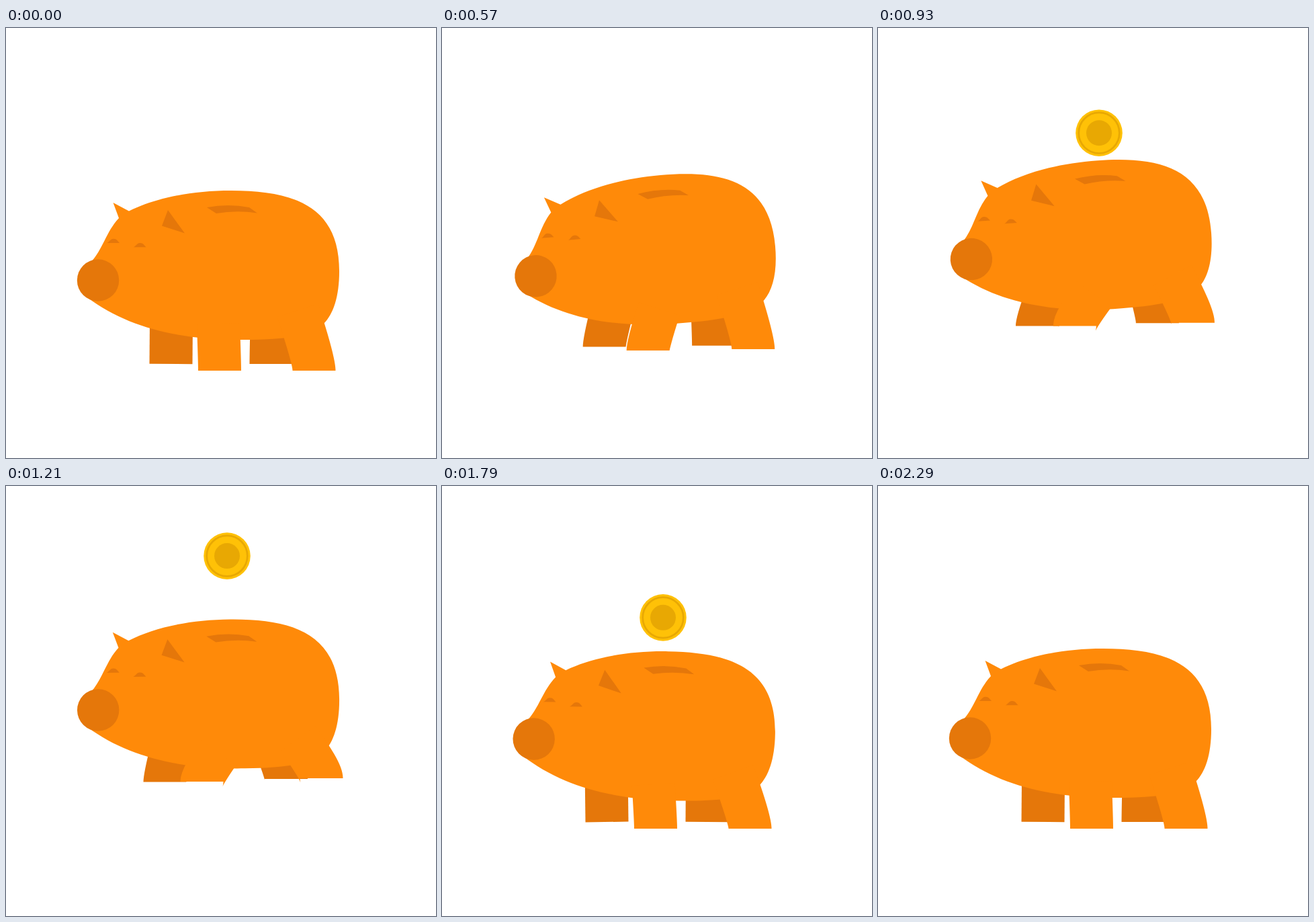
An HTML page for the animation above (3570 ms loop, 640 px wide and 640 px high).

```html
<!DOCTYPE html>
<html lang="en">
<head>
<meta charset="utf-8">
<title>Piggy bank</title>
<style>
  html, body { margin: 0; width: 100%; height: 100%; overflow: hidden; background: #fff; }
  svg { display: block; width: 100%; height: 100%; }
  .main { fill: #ff8a09; }
  .dark { fill: #e5770a; }
  .leg { fill: none; stroke: #ff8a09; stroke-width: 64; }
  .leg.far { stroke: #e5770a; }
</style>
</head>
<body>
<svg viewBox="0 0 640 640">
  <g id="coin">
    <circle r="34.8" fill="#ffc107"/>
    <circle r="30.3" fill="none" stroke="#e8a803" stroke-width="2.7"/>
    <circle r="19" fill="#e8a803"/>
  </g>
  <path class="leg far"/>
  <path class="leg far"/>
  <g id="body">
    <path class="main" d="M126 349C144 330 149 303 168 283L159.5 260L183 272.5
      C221 253.5 274 242 335 242C430 242 496 266 496 362C496 400 487 426 473 440
      C455 458 418 464 355 464C262 465 182 447 121 401Z"/>
    <circle class="dark" cx="137" cy="375.5" r="31.2"/>
    <path class="dark" d="M241 271L266 305.5L232 294.5Z"/>
    <path class="dark" id="eye" d="M150 320C154 319 155 313.8 160 313.8S166 317 169 320Z"/>
    <use href="#eye" x="39.5" y="6.3"/>
    <path class="dark" d="M299 267Q331 261 362 267L374 275.5Q343 271 313 276Z"/>
  </g>
  <path class="leg"/>
  <path class="leg"/>
</svg>
<script>
const LOOP = 3570, STEP = 50 / 7, REST = 32;
const PIVOT = { x: 301, y: 354 };
const TAKEOFF = 6, TOP_START = 16, TOP_END = 17, LANDING = 25;

const easeIn = p => u => u ** p;
const easeOut = p => u => 1 - (1 - u) ** p;
const easeBoth = u => (1 - Math.cos(Math.PI * u)) / 2;
const progress = (s, from, to) => Math.min(1, Math.max(0, (s - from) / (to - from)));

// Builds a motion from moves of the form [end step, end value, easing].
const motion = (start, ...moves) => s => {
  let from = 0, value = start;
  for (const [to, target, ease] of moves) {
    if (s < to) return value + (target - value) * ease(progress(s, from, to));
    from = to;
    value = target;
  }
  return value;
};

const tilt = motion(0, [4, 0.9, easeBoth], [10, -5.2, easeOut(3)], [17, -0.45, easeIn(1.6)],
  [21, 0.9, easeOut(2)], [25, 0.9, easeBoth], [28, -1.5, easeBoth], [REST, 0, easeBoth]);
const lift = motion(0, [4, 8, easeBoth], [15, -46, easeOut(1.65)], [17, -43.3, easeBoth],
  [25, 3.6, easeIn(2.8)], [27, 9, easeOut(2)], [REST, 0, easeBoth]);
const coinY = motion(295, [9, 275, easeIn(9)], [19, 99, easeOut(2.2)], [27, 295, easeIn(2.45)]);

// jump: foot offset at the top of the hop; kick: sideways swing while falling
const legs = [
  { hip: [246, 435], foot: [245.5, 500], jump: [-9, -59.5], kick: 0, fall: 3.4 },
  { hip: [396, 420], foot: [394.5, 500], jump: [22.5, -64], kick: 0, fall: 2.2 },
  { hip: [316, 440], foot: [318, 510], jump: [-26.5, -70], kick: -22, fall: 2.1 },
  { hip: [434, 420], foot: [458.5, 510], jump: [11, -75], kick: -14, fall: 1.4 }
];

function footAt(leg, s) {
  const up = easeOut(2.5)(progress(s, TAKEOFF, TOP_START));
  const down = progress(s, TOP_END, LANDING);
  const height = up - easeIn(leg.fall)(down);
  return [
    leg.foot[0] + leg.jump[0] * height + leg.kick * Math.sin(Math.PI * down),
    leg.foot[1] + leg.jump[1] * height
  ];
}

const body = document.getElementById('body');
const coin = document.getElementById('coin');
const legPaths = document.querySelectorAll('.leg');

function draw(s) {
  const angle = tilt(s), dy = lift(s);
  const rad = angle * Math.PI / 180, cos = Math.cos(rad), sin = Math.sin(rad);
  body.setAttribute('transform', `translate(0 ${dy}) rotate(${angle} ${PIVOT.x} ${PIVOT.y})`);
  coin.setAttribute('transform', `translate(329 ${coinY(s)})`);
  legs.forEach((leg, i) => {
    const rx = leg.hip[0] - PIVOT.x, ry = leg.hip[1] - PIVOT.y;
    const hipX = PIVOT.x + rx * cos - ry * sin;
    const hipY = PIVOT.y + rx * sin + ry * cos + dy;
    const [footX, footY] = footAt(leg, s);
    const ankleY = footY - 0.17 * (footY - hipY);
    legPaths[i].setAttribute('d', `M${hipX} ${hipY}Q${footX} ${ankleY} ${footX} ${footY}`);
  });
}

function tick() {
  const t = performance.now() % LOOP;
  draw(Math.min(REST, Math.floor((Math.floor(t / 10) + 0.5) / STEP)));
  requestAnimationFrame(tick);
}
tick();
</script>
</body>
</html>
```
